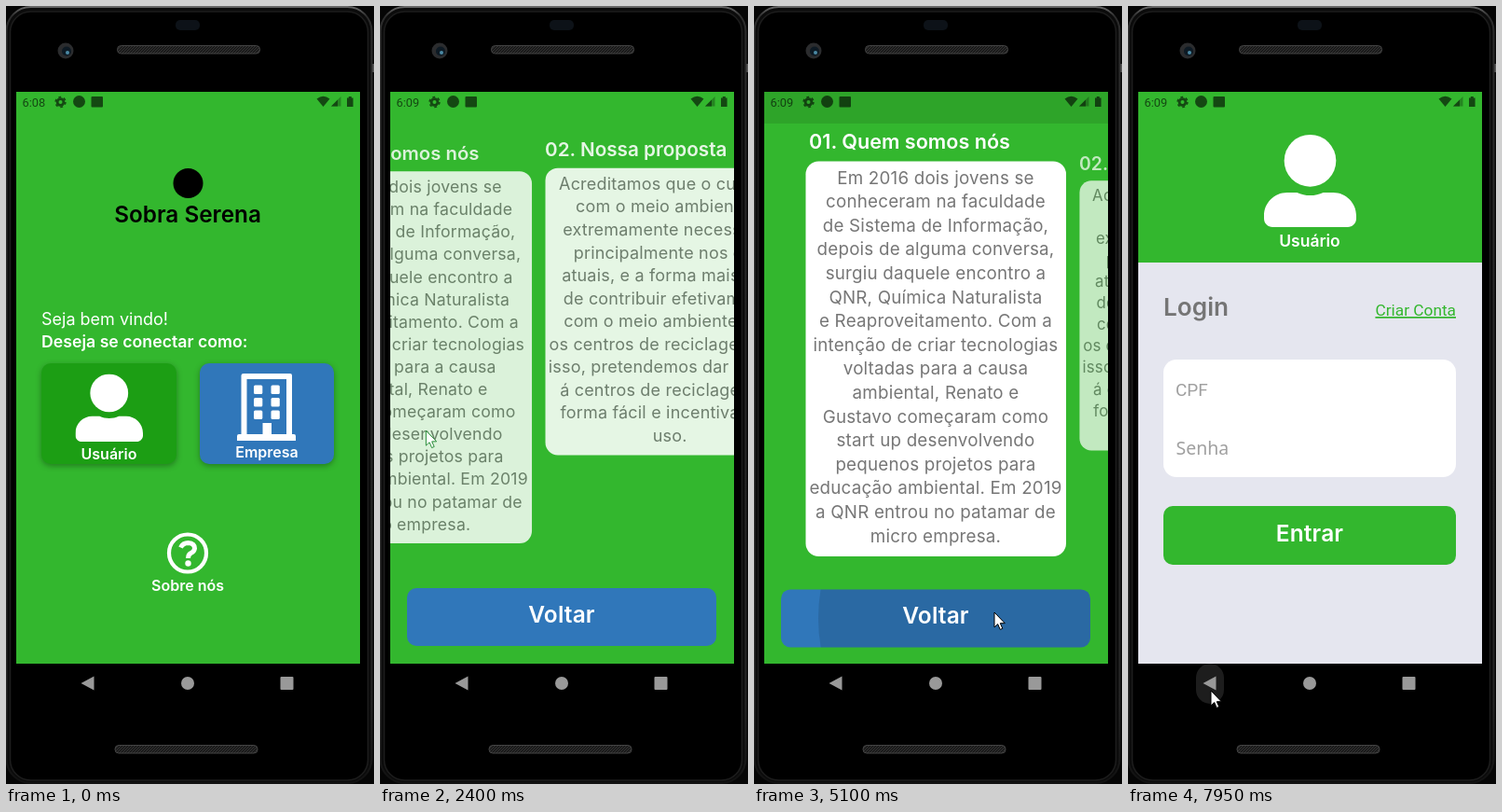
An HTML page for the animation above (8 s loop, 395x834 px).

```html
<!DOCTYPE html>
<html lang="pt-BR">
<head>
<meta charset="utf-8">
<title>Aplicativo de reciclagem</title>
<style>
html, body { margin: 0; width: 100%; height: 100%; overflow: hidden; background: #000; }
svg { display: block; width: 100%; height: 100%; }
text { font-family: Inter, sans-serif; }
.bold { font-weight: 600; }
.mid { text-anchor: middle; }
.roboto { font-family: Roboto, sans-serif; }
.noto { font-family: "Noto Sans", sans-serif; }
.white { fill: #fff; }
.green { fill: #33b72e; }
.blue { fill: #3077ba; }
.label { font-size: 16px; }
.button { font-size: 24.5px; letter-spacing: .1px; }
.heading { font-size: 21.6px; }
.body { font-size: 18.8px; letter-spacing: .2px; fill: #767676; }
.tile { filter: drop-shadow(0 2px 3px rgba(0, 0, 0, .32)); }
</style>
</head>
<body>
<svg viewBox="0 0 395 834">
  <defs>
    <clipPath id="screenClip"><rect x="11" y="92" width="369" height="613"/></clipPath>
    <clipPath id="aboutClip"><rect x="11" y="92" width="369" height="613"/></clipPath>
    <clipPath id="loginClip"><rect x="11" y="92" width="369" height="613"/></clipPath>
    <clipPath id="tileClip"><rect x="38" y="383" width="145" height="108" rx="10"/></clipPath>
    <clipPath id="backClip"><rect x="29" y="624" width="332" height="62" rx="10"/></clipPath>
    <linearGradient id="rim" x2="0" y2="1">
      <stop offset="0" stop-color="#666"/><stop offset=".012" stop-color="#2c2c2c"/>
      <stop offset=".9" stop-color="#262626"/><stop offset="1" stop-color="#111"/>
    </linearGradient>
    <pattern id="mesh" width="3" height="3" patternUnits="userSpaceOnUse">
      <rect width="3" height="3" fill="#2b2b2b"/><path d="M0 3L3 0" stroke="#111"/>
    </pattern>
    <symbol id="person" viewBox="0 0 512 512">
      <circle cx="256" cy="144" r="144"/>
      <path d="M384 320h-55c-22 10-47 16-73 16s-51-6-73-16h-55C57 320 0 377 0 448v16c0 27 21 48 48 48h416c27 0 48-21 48-48v-16c0-71-57-128-128-128z"/>
    </symbol>
  </defs>

  <!-- phone body -->
  <rect width="395" height="834" fill="#050505"/>
  <rect x="391" y="62" width="4" height="9" fill="#555"/>
  <rect x=".5" y="1" width="392" height="832" rx="26" fill="#0b0b0b" stroke="url(#rim)" stroke-width="2"/>
  <rect x="4.5" y="6" width="384" height="824" rx="22" fill="#000" stroke="#1d1d1d" stroke-width="1.5"/>
  <rect x="182" y="15" width="26" height="11" rx="5" fill="#0d1218"/>
  <circle cx="64" cy="48" r="8.5" fill="#2b2c2e"/>
  <circle cx="65" cy="48.5" r="5" fill="#0d1a24"/>
  <circle cx="66" cy="50" r="2" fill="#4b8aa5"/>
  <rect x="119.500" y="42.500" width="153" height="8.500" rx="4" fill="url(#mesh)" stroke="#444"/>
  <rect x="117" y="792.500" width="153" height="8.500" rx="4" fill="url(#mesh)" stroke="#444"/>
  <rect id="navPress" x="73" y="705" width="30" height="43" rx="15" fill="#1d1d1d"/>
  <g fill="#999">
    <path d="M80.500 726L94.500 718.500V733.500z"/>
    <circle cx="195" cy="726" r="7"/>
    <rect x="294.500" y="719" width="14" height="14" rx="1"/>
  </g>

  <g clip-path="url(#screenClip)">
    <g id="home">
      <rect class="green" x="11" y="92" width="369" height="640"/>
      <circle cx="195.500" cy="190" r="16"/>
      <text class="bold mid" x="195" y="232" font-size="24.300">Sobra Serena</text>
      <text class="white" x="38" y="342" font-size="18">Seja bem vindo!</text>
      <text class="white bold" x="38" y="366" font-size="17.700">Deseja se conectar como:</text>
      <rect class="tile" x="38" y="383" width="145" height="108" rx="10" fill="#1c9e14"/>
      <g clip-path="url(#tileClip)"><circle id="tileRipple" cx="130" cy="462" opacity=".12"/></g>
      <use class="white" href="#person" x="74.500" y="394.500" width="72.500" height="72.500"/>
      <text class="white bold label mid" x="110.500" y="486">Usuário</text>
      <rect class="tile blue" x="208" y="383" width="144" height="108" rx="10"/>
      <g class="white">
        <path fill-rule="evenodd" d="M255 394h50q2 0 2 2v63h2q2 0 2 2v5h-63v-5q0-2 2-2h2.500v-63q0-2 2.500-2zM258.500 400v59h17v-12h9.500v12h16v-59z"/>
        <g id="windows"></g>
      </g>
      <text class="white bold label mid" x="280" y="484">Empresa</text>
      <g fill="none" stroke="#fff">
        <circle cx="195" cy="586.500" r="20" stroke-width="4.200"/>
        <path d="M187.500 580.500Q190 575.500 195.500 575.500Q202.500 576 202.500 581.500Q202 585 198.500 586.500Q195.500 588 195.500 592" stroke-width="5"/>
      </g>
      <circle class="white" cx="195.500" cy="597.500" r="3.200"/>
      <text class="white bold label mid" x="195" y="627">Sobre nós</text>
    </g>
    <rect id="shade" x="11" y="92" width="369" height="613"/>

    <g id="about" clip-path="url(#aboutClip)"><g>
      <rect class="green" x="11" y="60" width="369" height="645"/>
      <g id="slides"></g>
      <rect class="blue" x="29" y="624" width="332" height="62" rx="10"/>
      <g clip-path="url(#backClip)"><circle id="backRipple" cx="257" cy="655" opacity=".12"/></g>
      <text class="white bold button mid" x="195" y="661">Voltar</text>
    </g></g>

    <g id="login" clip-path="url(#loginClip)"><g>
      <rect x="11" y="92" width="369" height="640" fill="#e5e6ef"/>
      <rect class="green" x="11" y="60" width="369" height="215"/>
      <use class="white" href="#person" x="146" y="138" width="99" height="99"/>
      <text class="white bold mid" x="195" y="258" font-size="17.500">Usuário</text>
      <text class="bold" x="38" y="332" font-size="26.200" fill="#757575">Login</text>
      <text class="roboto green" x="352" y="332" font-size="17.300" text-anchor="end" text-decoration="underline">Criar Conta</text>
      <rect class="white" x="38" y="379" width="314" height="126" rx="14"/>
      <g fill="#a0a0a0">
        <text class="roboto" x="51" y="418" font-size="19">CPF</text>
        <text class="noto" x="51.500" y="481" font-size="19.500">Senha</text>
      </g>
      <rect class="green" x="38" y="536" width="314" height="63" rx="10"/>
      <text class="white bold button mid" x="195" y="574">Entrar</text>
    </g></g>

    <!-- status bar -->
    <g opacity=".6">
      <text id="clock" class="roboto" x="17.500" y="107.500" font-size="12.800"></text>
      <circle cx="58.500" cy="103" r="3.400" fill="none" stroke="#000" stroke-width="2.800"/>
      <circle cx="58.500" cy="103" r="5.400" fill="none" stroke="#000" stroke-width="1.600" stroke-dasharray="2.830"/>
      <circle cx="78.500" cy="102.500" r="6.500"/>
      <rect x="91.500" y="97" width="12.500" height="11.500" rx="1"/>
      <path d="M333.500 99.500Q340.500 94 347.500 99.500L340.500 108z"/>
      <path d="M349 107.500L359.500 97V107.500z" opacity=".45"/>
      <path d="M349 107.500L356 100.500V107.500z"/>
      <path d="M366 98.500h1.800V97h3v1.500h1.800V108H366z"/>
    </g>
  </g>

  <path id="cursor" d="M0 0v16l3.700-3.400 2.500 5.800 2.600-1.100-2.500-5.600h5z" fill="#fff" stroke-width="1"/>
</svg>
<script>
const $ = id => document.getElementById(id);
const LOOP = 8000, FRAME = 77.2, FIRST = 66;
const HEIGHT = 613, SPACING = 280, CENTER_X = 195, CENTER_Y = 374;

const slides = [
  { title: '01. Quem somos nós', x: 60, lines: [
    'Em 2016 dois jovens se', 'conheceram na faculdade', 'de Sistema de Informação,',
    'depois de alguma conversa,', 'surgiu daquele encontro a', 'QNR, Química Naturalista',
    'e Reaproveitamento. Com a', 'intenção de criar tecnologias', 'voltadas para a causa',
    'ambiental, Renato e', 'Gustavo começaram como', 'start up desenvolvendo',
    'pequenos projetos para', 'educação ambiental. Em 2019', 'a QNR entrou no patamar de',
    'micro empresa.'] },
  { title: '02. Nossa proposta', x: 56, lines: [
    'Acreditamos que o cuidado', 'com o meio ambiente é', 'extremamente necessário,',
    'principalmente nos dias', 'atuais, e a forma mais fácil', 'de contribuir efetivamente',
    'com o meio ambiente, são', 'os centros de reciclagem. Por', 'isso, pretendemos dar acesso',
    'á centros de reciclagem de', 'forma fácil e incentivar seu', 'uso.'] }
];

$('slides').innerHTML = slides.map(({ title, x, lines }) => `<g>
  <text class="white bold heading" x="${x - 1}" y="152">${title}</text>
  <rect class="white" x="55.5" y="165" width="279.5" height="${lines.length * 25.6 + 14}" rx="14"/>
  ${lines.map((line, i) =>
    `<text class="body mid" x="195" y="${189.3 + i * 25.6}">${line}</text>`).join('')}
</g>`).join('');

$('windows').innerHTML = [406.5, 420, 433.5].map(y => [266, 284.5].map(x =>
  `<rect x="${x}" y="${y}" width="9.3" height="9.5" rx="1.5"/>`).join('')).join('');

// rows: time, x, y
const cursorPath = [
  [66, 336, 808], [760, 198, 572], [1440, 198, 572], [1680, 222, 456], [1840, 222, 456],
  [1996, 180, 456], [2460, 23, 455], [2980, 23, 455], [3500, 328, 415], [4080, 328, 415],
  [4790, 258, 650], [5500, 258, 650], [5790, 142, 478], [6500, 142, 478], [6860, 187, 350],
  [6940, 187, 350], [7710, 97, 735], [7850, 89, 734]
];
// rows: time, carousel offset
const swipe = [
  [1840, 0], [1996, 34], [2460, 190], [2640, 274], [2840, 280],
  [2980, 280], [3070, 250], [3480, 30], [3740, 0]
];

function track(rows, t) {
  if (t <= rows[0][0]) return rows[0].slice(1);
  const i = rows.findIndex(row => row[0] > t);
  if (i < 0) return rows[rows.length - 1].slice(1);
  const a = rows[i - 1], b = rows[i], f = (t - a[0]) / (b[0] - a[0]);
  return a.slice(1).map((v, n) => v + (b[n + 1] - v) * f);
}

const bezier = (s, a, b) => 3 * (1 - s) ** 2 * s * a + 3 * (1 - s) * s * s * b + s ** 3;

// cubic-bezier(.20833, .82, .25, 1) over 425 ms
function progress(t, start) {
  const x = (t - start) / 425;
  if (x <= 0) return 0;
  if (x >= 1) return 1;
  let low = 0, high = 1;
  for (let i = 0; i < 24; i++) {
    const s = (low + high) / 2;
    if (bezier(s, .20833, .25) < x) low = s; else high = s;
  }
  return bezier(low, .82, 1);
}

const show = (el, on) => el.setAttribute('display', on ? 'inline' : 'none');
const move = (el, x, y) => el.setAttribute('transform', `translate(${x} ${y})`);

// the screen is uncovered from the bottom while its content drifts up
function reveal(name, p) {
  show($(name), p > 0);
  $(name + 'Clip').firstElementChild.setAttribute('y', 92 + HEIGHT * (1 - p));
  move($(name).firstElementChild, 0, HEIGHT * .041 * (1 - p));
}

function render(time) {
  const t = time < FIRST ? 0 : FIRST + Math.floor((time - FIRST) / FRAME) * FRAME;
  const about = progress(t, 1161) - progress(t, 5078);
  const login = progress(t, 6240);
  const covered = Math.max(about, login);

  reveal('about', about);
  reveal('login', login);
  move($('home'), 0, -.02 * HEIGHT * covered);
  $('shade').setAttribute('opacity', .1 * Math.min(1, covered / .36));
  $('tileRipple').setAttribute('r', t < 6080 ? 0 : (t - 6040) * .48);
  $('backRipple').setAttribute('r', Math.max(0, (t - 4990) * 2));

  const [offset] = track(swipe, t);
  [...$('slides').children].forEach((slide, i) => {
    const d = i * SPACING - offset, away = Math.min(1, Math.abs(d) / SPACING);
    slide.setAttribute('transform', `translate(${CENTER_X + d} ${CENTER_Y}) ` +
      `scale(${1 - .1 * away}) translate(${-CENTER_X} ${-CENTER_Y})`);
    slide.setAttribute('opacity', 1 - .3 * away);
  });

  $('clock').textContent = t < 400 ? '6:08' : '6:09';
  show($('navPress'), t > 7860);
  show($('cursor'), t > 0);
  move($('cursor'), ...track(cursorPath, t));
  $('cursor').setAttribute('stroke', t > 1300 && t < 4080 ? '#2b8f3a' : '#000');
}

const begin = performance.now();
function tick() {
  render((performance.now() - begin) % LOOP);
  requestAnimationFrame(tick);
}
tick();
</script>
</body>
</html>
```
